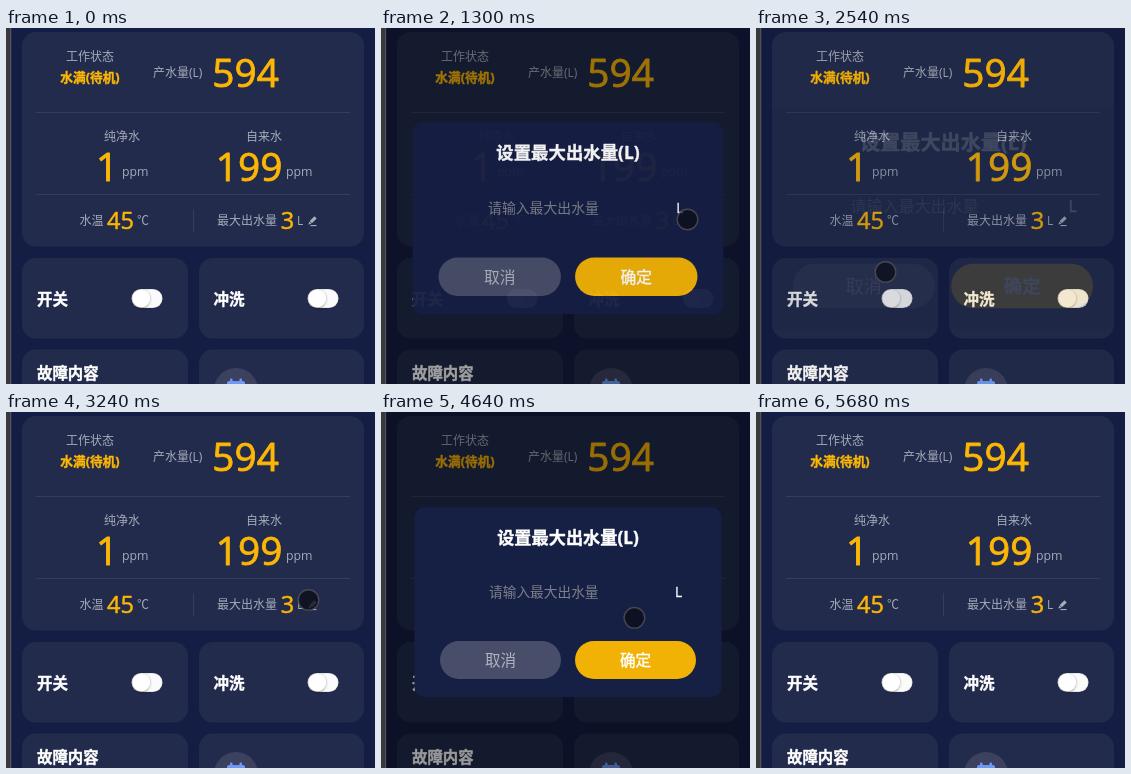
Write an HTML page with a canvas that moves like this. It is 369 px wide and 356 px high and loops after 6070 ms.

```html
<!DOCTYPE html>
<html lang="zh-CN">
<head>
<meta charset="utf-8">
<title>净水器面板</title>
<style>
html, body { margin: 0; width: 100%; height: 100%; overflow: hidden; background: #141d43; }
canvas { display: block; }
</style>
</head>
<body>
<canvas id="stage" width="369" height="356"></canvas>
<script>
const W = 369, H = 356, LOOP = 6070;
const FONT = '"Open Sans", "Noto Sans CJK SC", "Noto Sans CJK", sans-serif';
const GOLD = '#fcb605', LABEL = '#a7abba', WHITE = '#ffffff';
const BOLD = { weight: 700, stroke: 0.4 };
const makeLayer = () => Object.assign(document.createElement('canvas'), { width: W, height: H }).getContext('2d');
const stage = document.getElementById('stage').getContext('2d');
const panel = makeLayer(), dialog = makeLayer();

// Text is placed by the vertical middle of its glyphs; a thin stroke thickens it.
function text(c, str, x, y, size, color, { weight = 400, align = 'left', stroke = 0 } = {}) {
  c.font = `${weight} ${size}px ${FONT}`;
  c.textAlign = align;
  c.textBaseline = 'alphabetic';
  c.fillStyle = c.strokeStyle = color;
  c.fillText(str, x, y + size * 0.37);
  if (stroke) {
    c.lineWidth = stroke;
    c.lineJoin = 'round';
    c.strokeText(str, x, y + size * 0.37);
  }
}

const bigNumber = (c, str, x, y) => text(c, str, x, y, 38.8, GOLD, { stroke: 0.9 });
const smallNumber = (c, str, x, y) => text(c, str, x, y, 23.5, GOLD, { stroke: 0.5 });

function box(c, x, y, w, h, r, color) {
  c.fillStyle = color;
  c.beginPath();
  c.roundRect(x, y, w, h, r);
  c.fill();
}

function disc(c, x, y, r, color) {
  c.fillStyle = color;
  c.beginPath();
  c.arc(x, y, r, 0, Math.PI * 2);
  c.fill();
}

function toggle(c, x, y) {
  box(c, x, y, 31, 19, 9.5, '#e2e2e5');
  box(c, x + 0.7, y + 0.7, 29.6, 17.6, 8.8, '#fbfbfb');
  c.save();
  c.shadowColor = 'rgba(0,0,0,.4)';
  c.shadowBlur = 2.5;
  c.shadowOffsetY = 0.7;
  disc(c, x + 9.8, y + 9.4, 8.9, WHITE);
  c.restore();
}

function pencil(c) {
  c.save();
  c.translate(306, 193);
  c.rotate(Math.PI / 4);
  box(c, -1.6, -5.2, 3.2, 7, 0.8, LABEL);
  c.beginPath();
  c.moveTo(-1.6, 2.3);
  c.lineTo(1.6, 2.3);
  c.lineTo(0, 5);
  c.fill();
  c.restore();
  box(c, 304.5, 197, 6, 1.1, 0, LABEL);
}

function drawPanel(c) {
  box(c, 0, 0, W, H, 0, '#141d43');
  box(c, 0, 0, 4, H, 0, '#39393c');
  box(c, 4, 0, 1.3, H, 0, '#50525c');

  const card = '#222b4b';
  box(c, 16, 4, 342, 214.5, 14, card);
  for (const x of [16, 193]) {
    const w = x === 16 ? 166 : 165;
    box(c, x, 230, w, 80.5, 14, card);
    box(c, x, 321.5, w, 80, 14, card);
  }
  const rule = '#353d5a';
  box(c, 30, 84, 314, 1, 0, rule);
  box(c, 30, 166, 314, 1, 0, rule);
  box(c, 187, 181, 1, 23, 0, rule);

  text(c, '工作状态', 60, 28.4, 12, LABEL);
  text(c, '水满(待机)', 84, 49.5, 12.7, GOLD, { ...BOLD, align: 'center' });
  text(c, '产水量(L)', 147, 44.7, 12, LABEL);
  bigNumber(c, '594', 206.3, 44.7);

  text(c, '纯净水', 98, 109, 12, LABEL);
  text(c, '自来水', 240, 109, 12, LABEL);
  bigNumber(c, '1', 90, 138.7);
  text(c, 'ppm', 116, 143, 12.3, LABEL);
  bigNumber(c, '199', 209.8, 138.7);
  text(c, 'ppm', 280, 143, 12.3, LABEL);

  text(c, '水温', 73.5, 193, 12, LABEL);
  smallNumber(c, '45', 101, 192.8);
  text(c, '℃', 131, 193, 12, LABEL);
  text(c, '最大出水量', 211, 193, 12, LABEL);
  smallNumber(c, '3', 274.7, 192.8);
  text(c, 'L', 291, 193, 12, LABEL);
  pencil(c);

  text(c, '开关', 31, 271, 15.5, WHITE, BOLD);
  text(c, '冲洗', 207.5, 271, 15.5, WHITE, BOLD);
  text(c, '故障内容', 31, 345, 15.4, WHITE, BOLD);
  toggle(c, 125.5, 261);
  toggle(c, 301.5, 261);

  disc(c, 230, 362, 22, '#3b415f');
  const blue = '#6f98f4';
  box(c, 221, 353, 18, 12, 2, blue);
  box(c, 224, 350.5, 2.5, 5, 1, blue);
  box(c, 233.5, 350.5, 2.5, 5, 1, blue);
}

function drawDialog(c, scale) {
  c.clearRect(0, 0, W, H);
  c.save();
  c.translate(187, 190.5);
  c.scale(scale, scale);
  c.translate(-187, -190.5);
  box(c, 33.5, 95.3, 307, 189.7, 10, '#161f44');
  text(c, '设置最大出水量(L)', 187, 125.3, 17.2, WHITE, { ...BOLD, align: 'center' });
  text(c, '请输入最大出水量', 108, 180, 13.7, '#7d8089');
  text(c, 'L', 297.5, 180, 13.7, WHITE, { align: 'center', stroke: 0.3 });
  box(c, 59, 229, 121, 38, 19, '#484e69');
  box(c, 194, 229, 121, 38, 19, '#f1b205');
  text(c, '取消', 119.5, 248, 15.6, '#b0b3be', { align: 'center' });
  text(c, '确定', 254.5, 248, 15.6, WHITE, { align: 'center', stroke: 0.4 });
  c.restore();
}

// Equivalent of the CSS "ease" curve, cubic-bezier(.25, .1, .25, 1).
function ease(x) {
  if (x <= 0) return 0;
  if (x >= 1) return 1;
  const curve = (s, a, b) => 3 * s * (1 - s) ** 2 * a + 3 * s * s * (1 - s) * b + s ** 3;
  let lo = 0, hi = 1;
  for (let i = 0; i < 24; i++) {
    const mid = (lo + hi) / 2;
    if (curve(mid, 0.25, 0.25) < x) lo = mid; else hi = mid;
  }
  return curve(lo, 0.1, 1);
}

const FADE = 300;
const POPUPS = [{ open: 1090, close: 2370 }, { open: 3745, close: 5118 }];

function visibility(t) {
  for (const { open, close } of POPUPS) {
    if (t >= open && t < close + FADE) {
      return t < close ? ease((t - open) / FADE) : 1 - ease((t - close) / FADE);
    }
  }
  return 0;
}

// Pointer stops: time, x, y.
const PATH = [
  [290, 298, 305], [560, 309, 235], [830, 306.5, 191.5],
  [1690, 306.5, 191.5], [2070, 129.5, 244],
  [2560, 129.5, 244], [2930, 291, 188.5], [3240, 302.5, 188],
  [4500, 302.5, 188], [4890, 137.5, 248],
  [5200, 137.5, 248], [5600, 316.5, 343.5], [5680, 316.5, 343.5]
];
const PRESSES = [[900, 1050], [2220, 2370], [3620, 3740], [5040, 5118]];

function drawPointer(c, t) {
  const i = PATH.findIndex(p => p[0] > t);
  if (i < 1) return;
  const [t0, x0, y0] = PATH[i - 1], [t1, x1, y1] = PATH[i];
  const u = (t - t0) / (t1 - t0), k = u * u * (3 - 2 * u);
  const pressed = PRESSES.some(([a, b]) => t >= a && t < b);
  disc(c, x0 + (x1 - x0) * k, y0 + (y1 - y0) * k, pressed ? 14 : 10.3, 'rgba(12,14,26,.8)');
  c.strokeStyle = 'rgba(85,85,90,.75)';
  c.lineWidth = 1.4;
  c.stroke();
}

function render(t) {
  stage.drawImage(panel.canvas, 0, 0);
  const v = visibility(t);
  if (v > 0) {
    box(stage, 5, 0, W - 5, H, 0, `rgba(0,0,0,${0.4 * v})`);
    drawDialog(dialog, 1.2 - 0.2 * v);
    stage.globalAlpha = v;
    stage.drawImage(dialog.canvas, 0, 0);
    stage.globalAlpha = 1;
  }
  drawPointer(stage, t);
}

drawPanel(panel);
const start = performance.now();
function tick() {
  render((performance.now() - start) % LOOP);
  requestAnimationFrame(tick);
}
tick();
</script>
</body>
</html>
```
